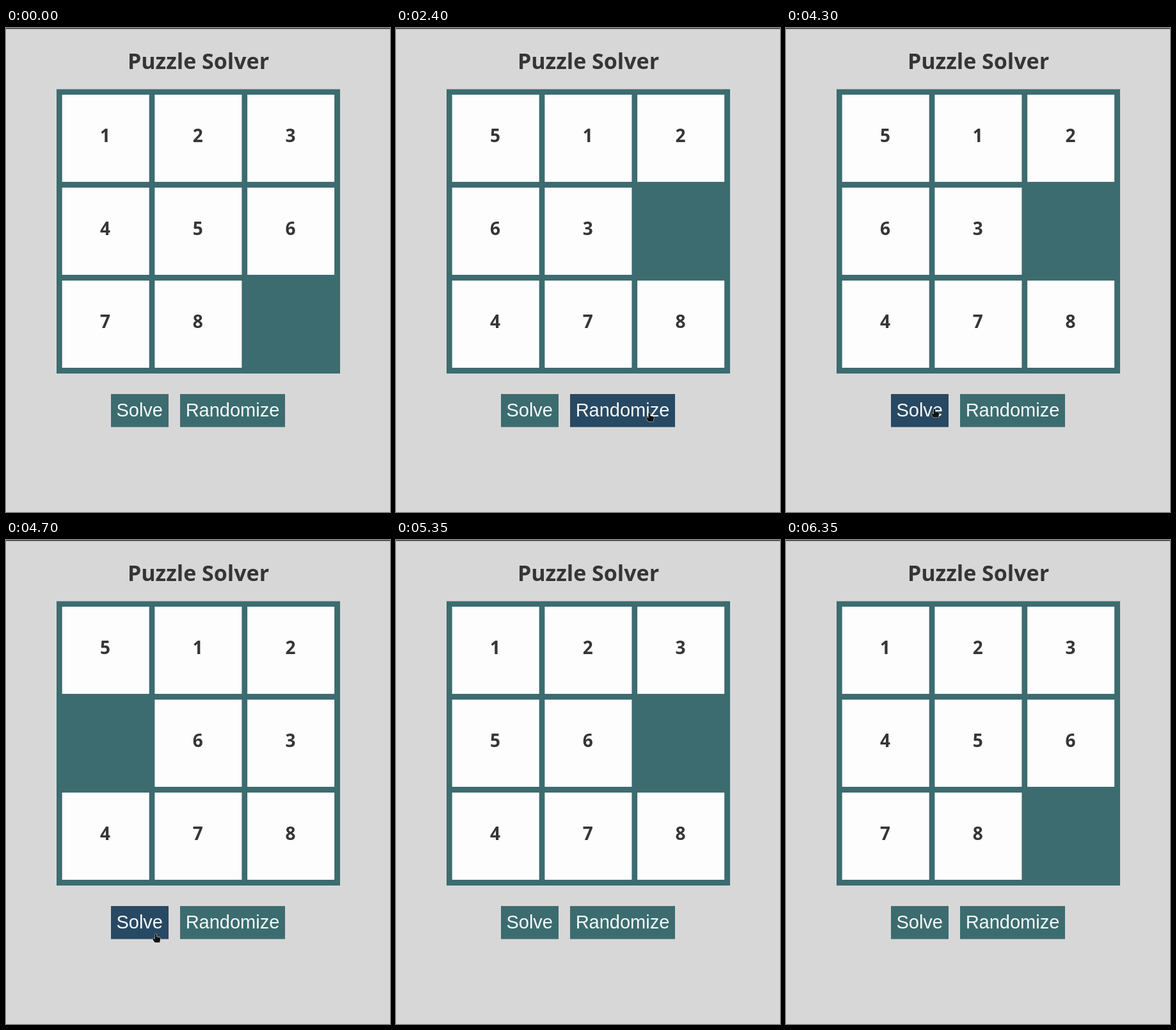
These frames come from a looping animation (600x755 px, 7600 ms). An HTML page:

```html
<!DOCTYPE html>
<html lang="en">
<head>
<meta charset="utf-8">
<title>Puzzle Solver</title>
<style>
  html, body { margin: 0; width: 100%; height: 100%; overflow: hidden; background: #d8d7d8; }
  svg { display: block; width: 600px; height: 755px; }
  text { text-anchor: middle; }
  .title, .tile text { font-family: "Noto Sans", "Open Sans", sans-serif; font-weight: 700; fill: #353535; }
  .title { font-size: 34px; }
  .tile text { font-size: 28px; }
  .tile rect { fill: #fdfdfe; }
  .button rect { fill: #3c6c6f; }
  .button.hover rect { fill: #284963; }
  .button text { font: 29px "Liberation Sans", Arial, sans-serif; fill: #f8fafa; }
  #cursor path { fill: #111; stroke: #eee; stroke-width: 1; stroke-linejoin: round; paint-order: stroke; }
</style>
</head>
<body>
<svg viewBox="0 0 600 755">
  <rect width="600" height="755" fill="#d8d7d8"/>
  <rect width="600" height="1.5" fill="#3c3c3e"/>
  <text class="title" x="300.5" y="64">Puzzle Solver</text>
  <rect x="79" y="95.5" width="443" height="443.5" fill="#3c6c6f"/>
  <g id="tiles"></g>
  <g class="button" id="solve">
    <rect x="164" y="571" width="90" height="51.5"/>
    <text x="208.7" y="606">Solve</text>
  </g>
  <g class="button" id="randomize">
    <rect x="272" y="571" width="164" height="51.5"/>
    <text x="354" y="606">Randomize</text>
  </g>
  <g id="cursor">
    <path id="arrow" d="M0 0V13L3 10.3L5.2 15.2L7.6 14.2L5.5 9.4H9.6Z"/>
    <path id="hand" d="M-1.4 .6Q0-.8 1.2.6V4.6L6 5.6Q7.4 6 7.2 7.6L6.2 13.4H-1.6L-4.8 8.4Q-4.6 6.6-3 7.2L-1.4 8.4Z"/>
  </g>
</svg>
<script>
const LOOP = 7600, STEP = 50;
const SHUFFLE_AT = 1700, SOLVE_AT = 4350, MOVE_TIME = 200;
const SOLVED = "12345678_", SHUFFLED = "51263_478";
const BLANK_PATH = [4, 3, 0, 1, 2, 5, 4, 3, 6, 7, 8];

// Pointer strokes as [time, x, y]; the pointer rests between strokes.
const STROKES = [
  [[450, 606, 732], [500, 576, 711], [700, 474, 660], [900, 402, 617], [1250, 397, 601], [1500, 396, 599]],
  [[2350, 396, 599], [2600, 393, 622], [2850, 386, 660], [3150, 374, 684]],
  [[3150, 374, 684], [3350, 335, 688], [3600, 265, 650], [3800, 214, 612], [3950, 197, 598], [4300, 232, 594]],
  [[4500, 232, 594], [4750, 235, 622], [5100, 244, 683], [5300, 252, 758]]
];

const $ = id => document.getElementById(id);

function addNode(parent, name, attrs) {
  const node = document.createElementNS("http://www.w3.org/2000/svg", name);
  for (const key in attrs) node.setAttribute(key, attrs[key]);
  return parent.appendChild(node);
}

const tiles = {};
for (const digit of "12345678") {
  const tile = tiles[digit] = addNode($("tiles"), "g", { class: "tile" });
  addNode(tile, "rect", { width: 136, height: 136 });
  addNode(tile, "text", { x: 67.3, y: 74 }).textContent = digit;
}

function boardAt(t) {
  if (t < SHUFFLE_AT) return SOLVED;
  const board = [...SHUFFLED];
  const moves = Math.floor((t - SOLVE_AT) / MOVE_TIME) + 1;
  let blank = board.indexOf("_");
  for (const next of BLANK_PATH.slice(0, Math.max(0, moves))) {
    [board[blank], board[next]] = [board[next], board[blank]];
    blank = next;
  }
  return board;
}

function slope(points, i, axis) {
  const a = points[i - 1], b = points[i + 1];
  return a && b ? (b[axis] - a[axis]) / (b[0] - a[0]) : 0;
}

function along(points, t) {
  let i = 0;
  while (t > points[i + 1][0]) i++;
  const a = points[i], b = points[i + 1], span = b[0] - a[0];
  const u = (t - a[0]) / span, v = 1 - u;
  return [1, 2].map(k =>
    v * v * (1 + 2 * u) * a[k] + u * u * (3 - 2 * u) * b[k] +
    span * u * v * (v * slope(points, i, k) - u * slope(points, i + 1, k)));
}

function pointerAt(t) {
  const points = STROKES.filter(s => s[0][0] <= t).pop();
  if (!points) return [700, 800];
  return along(points, Math.min(t, points[points.length - 1][0]));
}

function draw(t) {
  [...boardAt(t)].forEach((digit, i) => {
    if (digit === "_") return;
    const x = 87.7 + i % 3 * 144.7, y = 104 + Math.floor(i / 3) * 145;
    tiles[digit].setAttribute("transform", `translate(${x} ${y})`);
  });

  const [x, y] = pointerAt(t);
  const inRow = y > 571 && y < 622.5;
  const onSolve = inRow && x > 164 && x < 254;
  const onRandomize = inRow && x > 272 && x < 436;
  $("solve").classList.toggle("hover", onSolve);
  $("randomize").classList.toggle("hover", onRandomize);
  $("hand").style.display = onSolve || onRandomize ? "" : "none";
  $("arrow").style.display = onSolve || onRandomize ? "none" : "";
  $("cursor").setAttribute("transform", `translate(${x.toFixed(1)} ${y.toFixed(1)})`);
}

const start = performance.now();
function tick() {
  const t = (performance.now() - start) % LOOP;
  draw(Math.floor(t / STEP) * STEP);
  requestAnimationFrame(tick);
}
tick();
</script>
</body>
</html>
```
